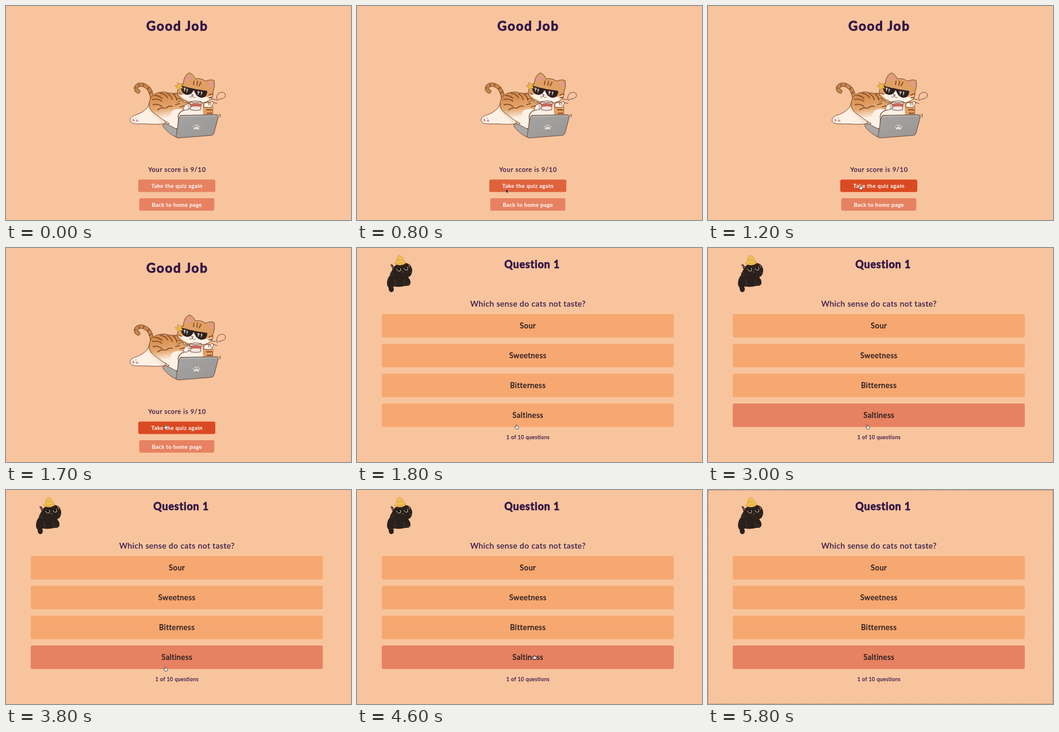
Recreate the animation shown at these times as an HTML page. Size 600 by 373 pixels, loop 5.9 s.

```html
<!DOCTYPE html>
<html lang="en">
<head>
<meta charset="utf-8">
<title>Cat quiz</title>
<style>
  html, body { margin: 0; width: 100%; height: 100%; overflow: hidden; background: #f8c49d; }
  svg { display: block; width: 600px; height: 373px; }
  text { font-family: Lato, "Open Sans", sans-serif; text-anchor: middle; fill: #321747; stroke: #321747; stroke-width: .25; stroke-linejoin: round; }
  .title { font-weight: 700; stroke-width: .8; }
  .button { font: 700 9.8px Lato, sans-serif; fill: #fff; stroke: none; }
  .answer { font-size: 13px; letter-spacing: .45px; fill: #271b20; stroke: #271b20; stroke-width: .4; }
  .ink { stroke: #64402f; stroke-width: .9; stroke-linecap: round; stroke-linejoin: round; }
  .line { fill: none; }
  .fur { fill: #e0a063; }
  .white { fill: #fdf1e6; }
  .stripe { fill: none; stroke: #8a4d2a; stroke-width: 1.8; stroke-linecap: round; }
</style>
</head>
<body>
<svg viewBox="0 0 600 373">
  <defs>
    <linearGradient id="coat" x1=".3" y1="0" x2=".45" y2="1">
      <stop offset=".1" stop-color="#d68d4e"/><stop offset=".45" stop-color="#e4a86f"/><stop offset=".7" stop-color="#fdf1e6"/>
    </linearGradient>
    <linearGradient id="leg" x1="1" x2="0" y2=".6">
      <stop offset=".1" stop-color="#d89a60"/><stop offset=".55" stop-color="#fdf1e6"/>
    </linearGradient>
    <linearGradient id="lid" x2="1" y2="1">
      <stop stop-color="#a5a4a2"/><stop offset="1" stop-color="#989795"/>
    </linearGradient>
  </defs>

  <g id="result">
    <text class="title" x="297.8" y="43" font-size="22.5" letter-spacing="1.6">Good Job</text>

    <g id="tabby">
      <!-- tail -->
      <path class="line" d="M254 160Q252 146 245 141Q237 135 230 138Q224 142 227 147L230 149" stroke="#64402f" stroke-width="7" stroke-linecap="round"/>
      <path class="line" d="M254 160Q252 146 245 141Q237 135 230 138Q224 142 227 147L230 149" stroke="#c98549" stroke-width="5.4" stroke-linecap="round"/>
      <path class="stripe" d="M249 152l4-2M246 145l3-3M239 139l1-3M232 139l-1-2M226 143l-1 0"/>
      <!-- stretched leg -->
      <path class="ink" fill="url(#leg)" d="M249 170C247 179 237 186 226 190C219 191 213 198 217 202C220 207 235 205 244 205.5Q263 207 277 205L279 176Z"/>
      <path d="M219 199l2-3 3 3-2 3zM225 201l3-4 3 5zM224 195l3-1 0 2z" fill="#c99a9a"/>
      <!-- chest -->
      <path class="ink white" d="M298 166Q309 158 347 166L360 176 359 192 292 197Z"/>
      <path class="fur" d="M341 166Q360 164 360 176L358 191H343Z"/>
      <path class="stripe" d="M349 175l9-1M349 181l9 0M350 187l8 0"/>
      <!-- back and near leg -->
      <path class="ink" fill="url(#coat)" d="M249 169C250 155 263 149 276 150Q290 154 302 151L309 168Q318 168 321 172Q322 179 309 182Q301 184 299 194L299 213Q288 217 279 211Q277 208 284 205Q270 197 262 190C252 184 248 178 249 169Z"/>
      <path class="white" d="M288 184Q297 177 308 181Q300 184 299 193L298 212Q288 215 281 211L286 206Q283 196 288 184Z"/>
      <path class="stripe" d="M259 156q7 0 12 5M255 163q9-2 16 3M268 152q9 1 13 8M281 153q7 4 8 10M256 172q9-2 15 3M264 181q6-5 12-3M278 178q6-5 11-3M292 155q5 4 5 9M295 172l7-2M303 176l6-2"/>
      <path class="line ink" d="M299 194Q299 185 308 182M281 208l4 3M287 209l3 4"/>
      <!-- head -->
      <path class="ink fur" d="M308 136Q310 119 319 116.5Q326 119 329 127Q339 125 347 131Q357 127 362 130Q364 141 360 150Q362 164 346 168Q326 173 309 165Q294 158 299 145Q302 139 308 136Z"/>
      <path d="M312 132Q313 123 319 120L325 127ZM350 134Q357 130 360 133L358 143Z" fill="#e29a8f"/>
      <path class="white" d="M300 153Q307 154 314 154L323 147 331 152Q337 161 352 158L359 156Q356 167 336 169Q311 168 300 153Z"/>
      <path class="stripe" d="M327 131l-1 6M333 131l-1 7M339 133l-3 6M353 155l6-2M353 160l5-1M301 152l4 2"/>
      <path d="M304 138.5L326 144.5Q325 155 315 155Q304 153 304 138.5ZM327 144.5L350 148Q350 160 339 160Q328 157 327 144.5ZM322 143l8 2v3l-8-2z" fill="#2b2020"/>
      <path d="M309 142l4 1-3 7zM314 144l3 1-3 7zM333 148l4 1-3 7zM339 149l3 1-3 7z" fill="#cfb9a8"/>
      <path class="line ink" d="M323 154l3 1-2 2zM324 157q-3 4-5 1M324 157q2 4 5 2M304 161l-8 1M305 164l-7 4M357 162l8 1M295 154l-5-1"/>
      <path d="M298 133l4 3 5-1-2 4 3 5-5-1-4 4-1-5-4-3 5-1z" fill="#efb843" stroke="#9a6b32" stroke-width=".6"/>
      <!-- mug and paws -->
      <path class="ink" fill="#f1e6df" d="M320 167Q330 164 340 167L338.5 181Q330 183.5 321.5 181Z"/>
      <path d="M321 170.5Q330 168.5 339.5 170.5L339 176Q330 174 321.3 176Z" fill="#c8685c"/>
      <path class="line ink" d="M320 167q10 3.5 20 0"/>
      <path class="ink white" d="M312 172q7-3 9 1t-3 7q-7 3-10 0zM344 176q-1-7 5-8l5 1 5-3q4 3 0 7-1 4-6 4z"/>
      <path class="line ink" d="M316 174l4 1M316 178l3 0M352 169l1 4M356 169l0 4M360 168l7 2M367 164q-2-7 3-12 7-4 11 1 3 7-7 9-5 0-7 3M370 190q2-2 3-1l-1 5"/>
      <!-- laptop -->
      <path class="ink" fill="#aaa8a5" d="M273 207Q275 204 280 206L300 216 297 229Q284 224 273 210Z"/>
      <path class="ink" fill="url(#lid)" d="M305 190.5L365 189.5Q370 189 369 194L362 221Q361 225 357 225.5L300 230Q295 230 296 225L301 194Q302 190.5 305 190.5Z"/>
      <path class="line" d="M304 193L366 191.5" stroke="#c4c2bf"/>
      <g fill="#e4e1dd">
        <path d="M327 213q4-5 8-1 3 3-1 3-3-1-6 0-3 1-1-2z"/>
        <circle cx="326" cy="210.5" r="1.1"/><circle cx="329.5" cy="208" r="1.2"/>
        <circle cx="333.5" cy="208" r="1.2"/><circle cx="336.8" cy="210.5" r="1.1"/>
      </g>
    </g>

    <text x="297.5" y="289" font-size="11.2" letter-spacing=".65">Your score is 9/10</text>
    <rect id="again" x="230" y="302.4" width="134" height="21.8" rx="3"/>
    <text class="button" x="297.2" y="317" letter-spacing=".35">Take the quiz again</text>
    <rect x="231.7" y="335" width="130.6" height="21.8" rx="3" fill="#e68261"/>
    <text class="button" x="297.1" y="349.5" letter-spacing=".25">Back to home page</text>
  </g>

  <g id="question">
    <g id="blackCat">
      <path d="M64 33Q62 27 58 29L62 37Q58 43 57 48C51 55 51 66 55 69Q55 77 60 77Q66 76 63 67Q75 69 84 66Q94 67 93 59Q92 54 89 51Q96 48 96 39Q95 29 88 27Q74 23 64 33Z" fill="#2a211c"/>
      <path d="M59 30l5 5M90 29l2 5" stroke="#b9635a" stroke-width="1.5"/>
      <path d="M69 36q1 5 6 4 2-2 0-5M82 35q1 5 6 3 1-3-1-5" fill="#15110f" stroke="#e5d2ae"/>
      <path d="M78 41l3 0-1 2z" fill="#8a6555"/>
      <path class="line" d="M63 43l-6 1M64 46l-5 3M91 42l4 1M65 55q4 8 1 12M82 55q-1 6 1 10M86 61l1 4M90 61l0 4" stroke="#594940" stroke-width=".7"/>
      <path d="M65 27Q67 24 69 23Q68 15 74 13Q80 15 81 21Q85 23 84 27Q75 33 65 27Z" fill="#f0bf56" stroke="#c78b35" stroke-width=".7"/>
      <path class="line" d="M70 22l2-2 2 2 2-2 2 2M69 26q6 2 12-1" stroke="#cf963b" stroke-width=".7"/>
    </g>
    <text class="title" x="304.6" y="35" font-size="18" letter-spacing=".8">Question 1</text>
    <text x="297.4" y="101.5" font-size="13.7" letter-spacing=".5">Which sense do cats not taste?</text>
    <g id="answers"></g>
    <text x="297.4" y="332.5" font-size="9" letter-spacing=".4">1 of 10 questions</text>
  </g>

  <path id="arrow" d="M0 0V7.2L1.7 5.7 2.9 8.4 4.2 7.8 3 5.2H5.2Z" fill="#111" stroke="#fff" stroke-width=".5"/>
  <path id="hand" d="M-.9-3.2Q0-4.2.7-3.2V-1L3 -.4Q3.7 0 3.4 1.5L2.6 4H-1.2L-3.2 1Q-3-.2-1.9.4L-.9 1Z" fill="#fff" stroke="#222" stroke-width=".7" stroke-linejoin="round"/>
  <rect id="marquee" x=".5" y=".5" width="599" height="372" fill="none" stroke="#786b65" stroke-opacity=".75" stroke-dasharray="2 2"/>
</svg>
<script>
const LOOP = 5900, OPEN = 1800, LEAVE = 4900;
const $ = id => document.getElementById(id);
const show = (id, on) => $(id).style.display = on ? '' : 'none';
const ramp = (t, from, to) => Math.min(1, Math.max(0, (t - from) / (to - from)));
const smooth = k => k * k * (3 - 2 * k);
const mix = (a, b, k) => `rgb(${a.map((v, i) => v + (b[i] - v) * k)})`;

const CORAL = [230, 130, 97], RED = [218, 74, 34], ORANGE = [247, 168, 113];

$('answers').innerHTML = ['Sour', 'Sweetness', 'Bitterness', 'Saltiness'].map((label, i) => `
  <rect x="43" y="${115 + 52 * i}" width="508" height="41" rx="3" fill="rgb(${ORANGE})"/>
  <text class="answer" x="297.2" y="${140.3 + 52 * i}">${label}</text>`).join('');
const lastAnswer = $('answers').querySelectorAll('rect')[3];

// Pointer stops: time, x, y
const stops = [
  [400, 584, 250], [780, 259, 318.5], [1000, 259, 318.5],
  [1500, 277.5, 311.5], [4000, 277.5, 311.5], [4500, 308, 291], [LEAVE, 308, 291]
];

function pointerAt(t) {
  const next = Math.max(1, stops.findIndex(s => s[0] > t));
  const [a, b] = [stops[next - 1], stops[next]];
  const k = smooth(ramp(t, a[0], b[0]));
  return [a[1] + (b[1] - a[1]) * k, a[2] + (b[2] - a[2]) * k];
}

function draw(now) {
  const t = now % LOOP;
  const visible = t >= 400 && t < LEAVE, pointing = t >= 900;
  show('result', t < OPEN);
  show('question', t >= OPEN);
  show('arrow', visible && !pointing);
  show('hand', visible && pointing);
  show('marquee', t >= LEAVE);
  $('again').setAttribute('fill', mix(CORAL, RED, ramp(t, 720, 860)));
  lastAnswer.setAttribute('fill', mix(ORANGE, CORAL, ramp(t, OPEN, OPEN + 150)));
  if (visible) $(pointing ? 'hand' : 'arrow').setAttribute('transform', `translate(${pointerAt(t)})`);
  requestAnimationFrame(draw);
}
requestAnimationFrame(draw);
</script>
</body>
</html>
```
